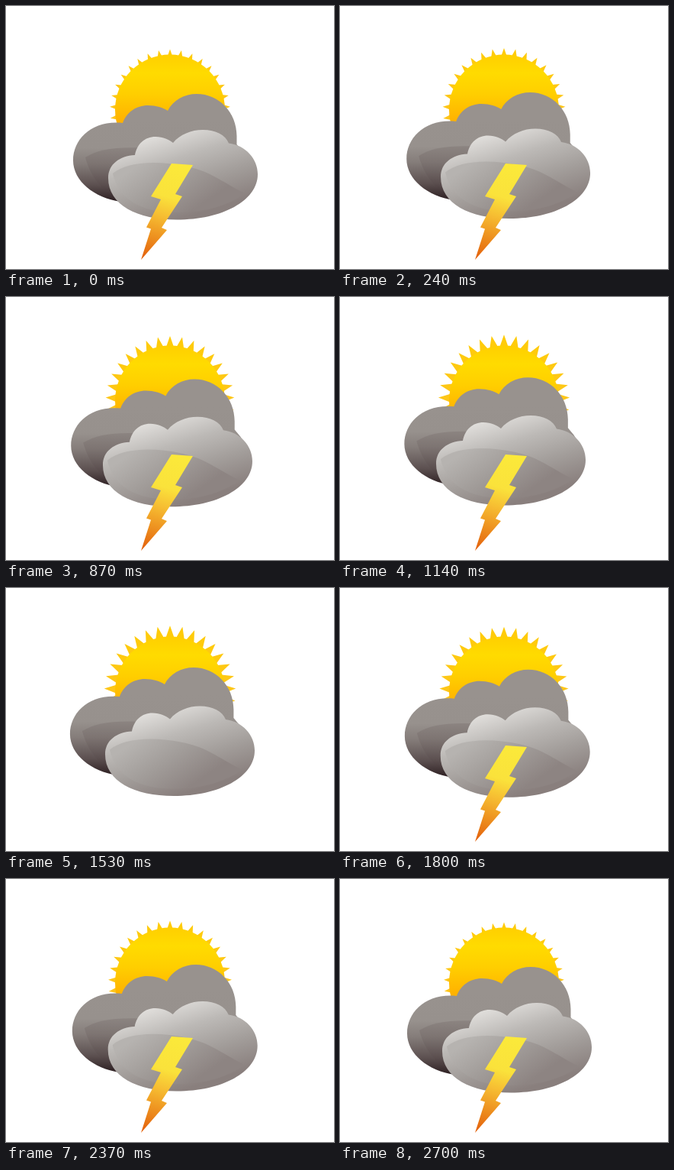
Recreate the animation shown at these times as an HTML page with a canvas. Size 430 by 344 pixels, loop 2730 ms.

```html
<!DOCTYPE html>
<html lang="en">
<head>
<meta charset="utf-8">
<title>Thunderstorm</title>
<style>
html, body { margin: 0; width: 100%; height: 100%; overflow: hidden; background: #fff; }
canvas { display: block; }
</style>
</head>
<body>
<canvas id="stage" width="430" height="344"></canvas>
<script>
const ctx = document.getElementById('stage').getContext('2d');
const LOOP = 2730, STEP = 30;
const SUN = { x: 215, y: 135.5, r: 72, rays: 33 };

const backCloud = new Path2D(`M212 137 C219 123 234 115 250 115 C279 115 302.5 139 302.5 170
  L302.5 181 L310 190 C316 198 318 210 312 225 L290 250 L150 256
  C116 251 88 229 88 202 C88 174 113 149 153 153 C158 139 171 130 186 130 C197 130 206 133 212 137Z`);
const backShade = new Path2D(`M104 198 C123 186 152 183 196 187 L250 210 L220 256 L148 252
  C126 243 110 222 104 198Z`);
const frontCloud = new Path2D(`M169 195 C172 180 182 171 196 171 C206 171 214 175 219 179
  C228 168 243 162 258 162 C275 162 288 169 292 179.5 C314 182 330 200 330 220
  C330 255 283 279.5 224 279.5 C172 279.5 134 260 134 225 C134 207 149 196 169 195Z`);
const frontShade = new Path2D(`M140 219 C158 204 196 201 238 210 C270 217 286 232 313 245
  C288 263 258 270 222 270 C178 270 147 253 140 219Z`);
const bolt = new Path2D(`M217 206 L245 208 L222 246 L231 249 L204 290 L211 293
  L177 332 L190 291.5 L184 289.5 L203 253 L190 249Z`);

function gradient(x0, y0, x1, y1, ...stops) {
  const g = ctx.createLinearGradient(x0, y0, x1, y1);
  stops.forEach(([at, color]) => g.addColorStop(at, color));
  return g;
}

const sunFill = gradient(0, 64, 0, 150, [0, '#ffcf00'], [0.28, '#ffdb00'], [0.6, '#ffce00'], [1, '#ffb200']);
const rayFill = gradient(0, 50, 0, 150, [0, '#ffcc08'], [1, '#fdc51c']);
const backFill = gradient(0, 150, 0, 258, [0, '#98928e'], [0.33, '#97918d'], [0.52, '#857d7a'], [0.78, '#5c5050'], [1, '#281a1d']);
const backShadeFill = gradient(0, 184, 0, 252, [0, 'rgba(105,93,92,.25)'], [1, 'rgba(70,55,57,.1)']);
const frontFill = gradient(190, 166, 226, 280, [0, '#e5e3e0'], [0.35, '#bcb9b6'], [0.65, '#a39e9b'], [1, '#897f7d']);
const frontShadeFill = gradient(185, 200, 235, 274, [0, '#b6b3b0'], [0.5, '#a19c99'], [1, '#8d8482']);
const boltFill = gradient(225, 206, 190, 332, [0, '#fbe93a'], [0.35, '#fae23b'], [0.55, '#f6bd32'], [1, '#e4620c']);

// Rises evenly to 1 at the peak, then falls evenly to 0 at frame 90.
const swing = (frame, peak) => frame < peak ? frame / peak : (90 - frame) / (90 - peak);

function interpolate(points, x) {
  const i = Math.max(1, points.findIndex(p => p[0] >= x));
  const [x0, y0] = points[i - 1], [x1, y1] = points[i];
  return y0 + (y1 - y0) * (x - x0) / (x1 - x0);
}

const frontDrift = [[0, 0], [33, -8], [38, -8], [51, -4], [69, -0.6], [90, 0]];

function fill(path, style) {
  ctx.fillStyle = style;
  ctx.fill(path);
}

function at(dx, dy, draw) {
  ctx.save();
  ctx.translate(dx, dy);
  draw();
  ctx.restore();
}

function drawSun(tip) {
  const rays = new Path2D(), disc = new Path2D();
  const point = (angle, r, side) => [
    SUN.x + r * Math.sin(angle) + side * Math.cos(angle),
    SUN.y - r * Math.cos(angle) + side * Math.sin(angle)
  ];
  for (let i = 0; i < SUN.rays; i++) {
    const angle = i * 2 * Math.PI / SUN.rays;
    rays.moveTo(...point(angle, tip - 18, -6.3));
    rays.lineTo(...point(angle, tip, 0));
    rays.lineTo(...point(angle, tip - 18, 6.3));
    rays.closePath();
  }
  disc.arc(SUN.x, SUN.y, SUN.r, 0, 2 * Math.PI);
  fill(rays, rayFill);
  fill(disc, sunFill);
}

function render(now) {
  const frame = Math.floor((now % LOOP) / STEP);
  const backSwing = swing(frame, 47);
  ctx.fillStyle = '#fff';
  ctx.fillRect(0, 0, 430, 344);

  drawSun(79 + 8.5 * swing(frame, 45));
  at(-4.5 * backSwing, -12 * backSwing, () => {
    fill(backCloud, backFill);
    fill(backShade, backShadeFill);
  });
  at(interpolate(frontDrift, frame), -8.5 * swing(frame, 46), () => {
    fill(frontCloud, frontFill);
    fill(frontShade, frontShadeFill);
  });

  const beat = frame % 18;
  if (beat < 12 || beat > 15) fill(bolt, boltFill);
}

const start = performance.now();
function tick() {
  render(performance.now() - start);
  requestAnimationFrame(tick);
}
tick();
</script>
</body>
</html>
```
